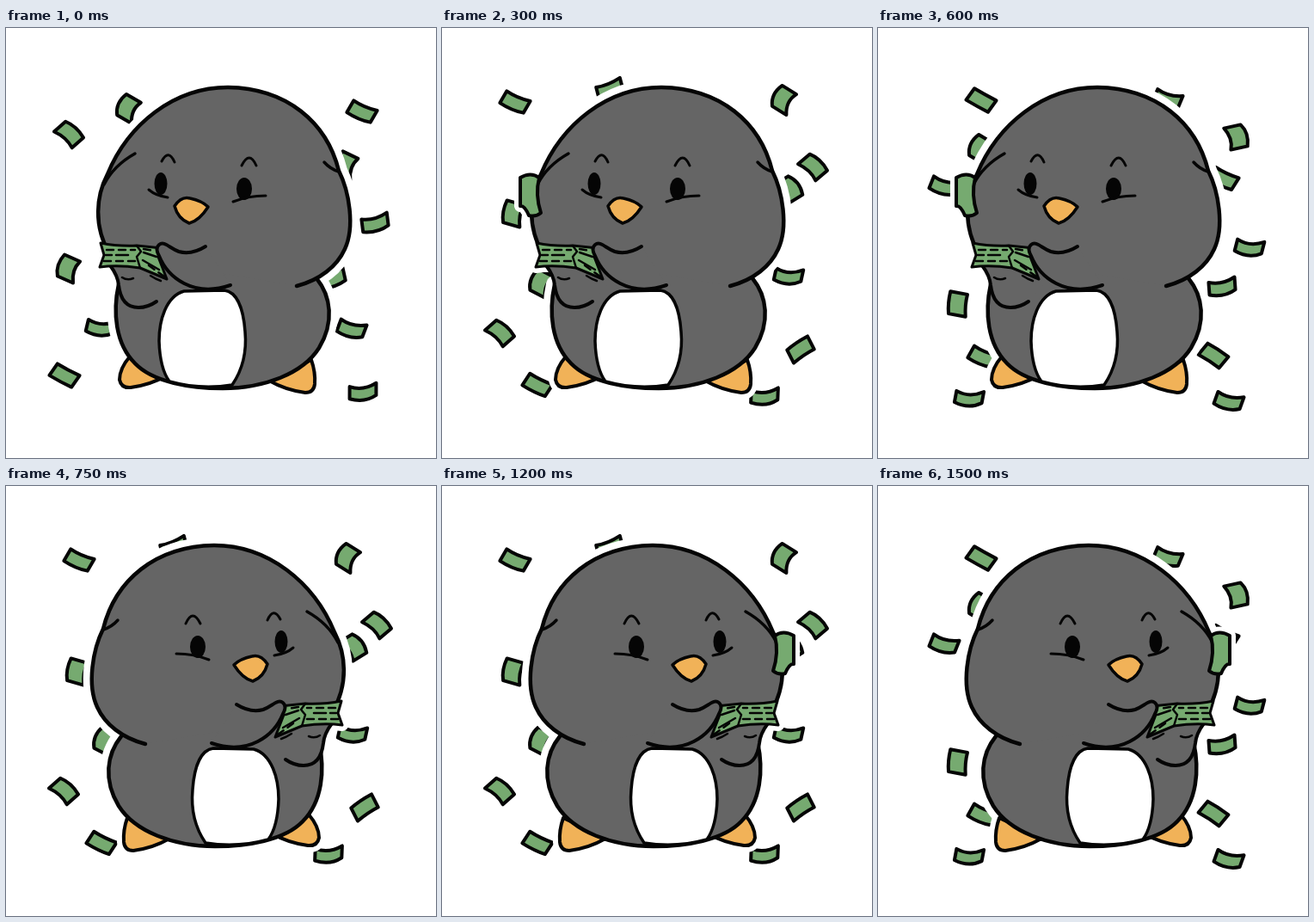
Recreate the animation shown at these times as an HTML page with a canvas. Size 500 by 500 pixels, loop 1.65 s.

```html
<!DOCTYPE html>
<html lang="en">
<head>
<meta charset="utf-8">
<title>Penguin tossing cash</title>
<style>
  html, body { margin: 0; width: 100%; height: 100%; overflow: hidden; background: #fff; }
  canvas { display: block; }
</style>
</head>
<body>
<canvas id="stage" width="500" height="500"></canvas>
<script>
const ctx = document.getElementById('stage').getContext('2d');
const GREY = '#656565', GREEN = '#76aa70', ORANGE = '#f1b258', INK = '#050505';
const STEP = 150, STEPS = 11;

// Three alternating showers; each bill is x, y, angle in degrees
const showers = [
  [
    [143, 94, 114], [73, 124, 42], [414, 97, 23], [396, 160, 110], [429, 226, -15], [73, 280, 108],
    [379, 291, -20], [402, 349, 13], [110, 347, 5], [68, 404, 28], [415, 422, -8]
  ],
  [
    [120, 84, 29], [337, 82, 15], [416, 127, 72], [120, 141, 115], [402, 175, 25], [77, 183, 14],
    [432, 254, 6], [400, 300, -12], [93, 321, 95], [122, 382, 22], [390, 381, 33], [106, 429, 2], [408, 433, 12]
  ],
  [
    [85, 86, 23], [195, 71, -22], [398, 84, 116], [431, 162, 43], [403, 188, 52], [83, 216, 100],
    [403, 287, 4], [116, 297, 112], [67, 355, 42], [417, 374, -34], [111, 415, 26], [375, 427, -6]
  ]
];

// Penguin outlines, facing left
const BODY = 'M131 298C124 330 127 367 150 390C171 412 215 419 252 419C300 419 345 402 364 372C382 342 378 312 361 291';
const HEAD = 'M118 264C98 230 102 195 115 170C139 112 192 69 255 69C324 70 370 110 384 166C396 190 403 231 391 257C382 277 362 293 335 300';
const BELLY = 'M207 306C186 312 178 340 178 364Q179 396 190 411Q226 421 263 415C276 396 280 375 278 353C276 325 268 307 254 305Z';
const FEET = [
  'M144 382Q132 396 132 409Q134 419 145 418Q168 415 187 404L160 385Z',
  'M306 410Q325 421 348 424Q358 424 359 414Q360 400 355 386L325 400Z'
];
const HAND = 'M121 276Q130 288 131 299Q134 325 154 325Q165 325 175 318';
const THUMB = 'M135 290Q141 294 148 291M168 288Q174 292 180 294';
const STACK = 'M110 250Q130 254 152 253L181 256L177 266L187 292L156 279Q130 275 109 278L114 264Z';
const NOTES = 'M116 264H123M128 264H142M152 253L157 260L152 266L156 279M160 261L175 266M159 270L178 281';
const REST_ARM = 'M232 254Q216 264 201 260C190 256 184 247 178 252Q173 256 178 265C188 290 218 314 261 299';
const TOSS_ARM = 'M229 254C200 253 177 239 160 246Q153 251 162 263C181 290 209 310 247 304';
const TOSSED = 'M129 219Q116 224 104 223Q106 241 110 254L140 254Q130 237 129 219Z';
const FLOWN = 'M91 174Q103 167 113 174Q108 194 115 215Q109 220 101 218Q96 206 91 207Z';

function shape(d, fill, width = 4, dx = 0, dy = 0, cover = '') {
  ctx.save();
  ctx.translate(dx, dy);
  if (fill) {
    ctx.fillStyle = fill;
    ctx.fill(new Path2D(d + cover));
  }
  ctx.lineWidth = width;
  ctx.stroke(new Path2D(d));
  ctx.restore();
}

function oval(x, y, rx, ry) {
  ctx.fillStyle = INK;
  ctx.beginPath();
  ctx.ellipse(x, y, rx, ry, 0, 0, 7);
  ctx.fill();
}

// Upright bills look shorter and wider; the curl follows the angle
function bill([x, y, degrees]) {
  const a = degrees * Math.PI / 180, tilt = Math.abs(Math.sin(a));
  const l = 17 - 3 * tilt, w = 6.5 + 3.5 * tilt, curl = 8 * Math.cos(3 * a);
  ctx.save();
  ctx.translate(x, y);
  ctx.rotate(a);
  shape(`M${2 - l} ${-w}Q0 ${curl - w} ${l} ${-w}L${l - 2} ${w}Q0 ${curl + w} ${-l} ${w}Z`, GREEN);
  ctx.restore();
}

function face(dx, dy) {
  ctx.save();
  ctx.translate(dx, dy);
  oval(177, 181, 7.5, 13);
  oval(274, 187, 9, 13);
  shape('M163 188Q171 195 185 197M261 202Q278 195 299 195', null, 3);
  shape('M178 155Q186 140 193 156M271 160Q280 142 288 160', null, 3);
  shape('M193 207Q201 195 211 198Q225 201 232 208Q222 224 210 227Q197 222 193 207Z', ORANGE, 3.5);
  shape('M147 146Q122 160 111 182M367 156Q374 164 384 167', null, 3.5);
  ctx.restore();
}

function penguin(i) {
  const right = i > 4, turning = i % 5 === 0 && i < 10;
  const tossing = !turning && i % 2 === 1;
  const flown = !turning && !tossing && i !== 6;
  const hx = tossing ? -4 : turning ? 3 : 0, hy = tossing ? 4 : 0;
  const bx = (right ? 2 : 0) + (tossing ? -5 : turning && right ? 3 : 0);
  const fx = right ? 4 : 0;

  ctx.save();
  if (right) {
    ctx.translate(500, 0);
    ctx.scale(-1, 1);
  }
  // White sticker border
  ctx.strokeStyle = '#fff';
  shape(HEAD, null, 20, hx, hy);
  shape(BODY, null, 20, bx);
  FEET.forEach(d => shape(d, null, 16, fx));
  shape(STACK, null, 14);
  if (flown) shape(FLOWN, null, 14);

  ctx.strokeStyle = INK;
  FEET.forEach(d => shape(d, ORANGE, 4, fx));
  shape(BODY, GREY, 4.5, bx, 0, 'L330 230L150 250Z');
  shape(BELLY, '#fff', 3.5, bx);
  shape(HAND, GREY, 4, 0, 0, 'L200 290L180 260Z');
  shape(HEAD, GREY, 4.5, hx, hy);
  face(hx, hy);
  if (tossing) shape(TOSSED, GREEN, 3.5);
  shape(STACK, GREEN, 3);
  shape(NOTES, null, 2.5);
  ctx.setLineDash([8, 6]);
  shape('M117 258H150M114 271H150M160 257L172 259M166 276L184 289', null, 2.5);
  ctx.setLineDash([]);
  shape(THUMB, null, 2.5);
  shape(tossing ? TOSS_ARM : REST_ARM, GREY);
  if (flown) shape(FLOWN, GREEN);
  ctx.restore();
}

function draw(time) {
  const i = Math.floor(time / STEP) % STEPS;
  ctx.fillStyle = '#fff';
  ctx.fillRect(0, 0, 500, 500);
  ctx.lineCap = ctx.lineJoin = 'round';
  ctx.strokeStyle = INK;
  showers[i % 3].forEach(bill);
  penguin(i);
}

const start = performance.now();
function tick() {
  draw(performance.now() - start);
  requestAnimationFrame(tick);
}
tick();
</script>
</body>
</html>
```
